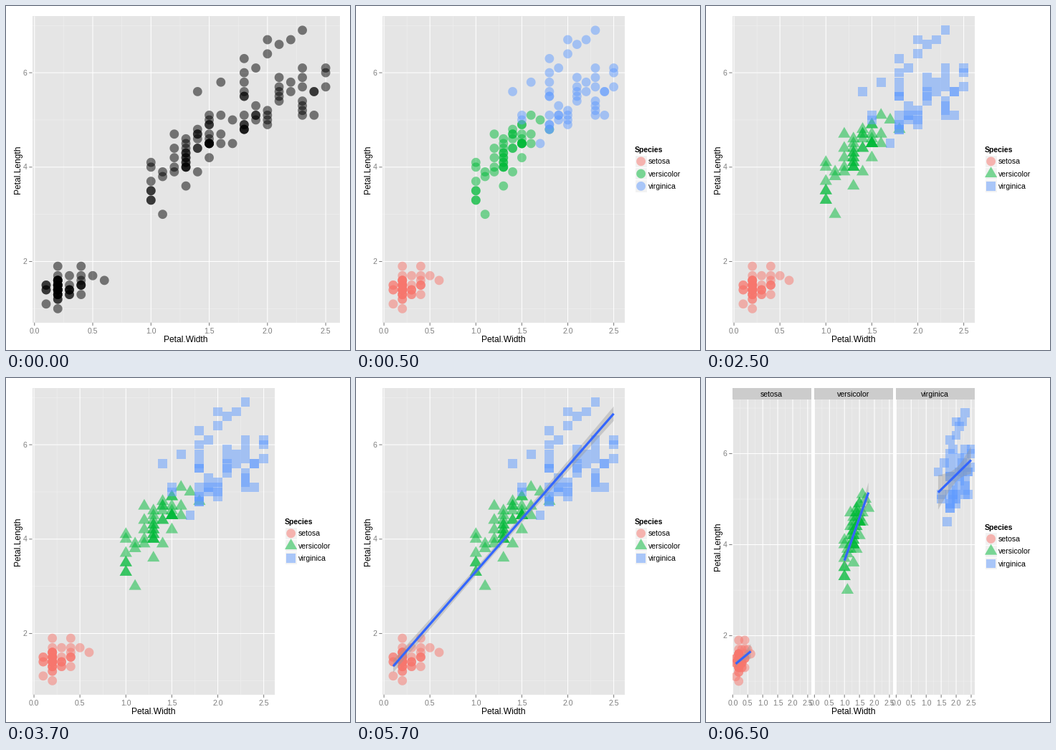
These frames come from a looping animation (480 px wide and 480 px high, 8000 ms). A matplotlib script:

```python
import numpy as np
import matplotlib.pyplot as plt
from matplotlib.animation import FuncAnimation
from matplotlib.collections import PolyCollection
from matplotlib.patches import Polygon, Rectangle

SIZE = 480
plt.rcParams.update({
    "font.family": "Liberation Sans",
    "text.hinting": "force_autohint",
    "text.hinting_factor": 8,
})

# Petal lengths grouped by petal width
setosa = {
    0.1: [1.1] + [1.4] * 2 + [1.5] * 2,
    0.2: [1.0] + [1.2] * 2 + [1.3] * 4 + [1.4] * 8 + [1.5] * 7
         + [1.6] * 5 + [1.7, 1.9],
    0.3: [1.3] * 2 + [1.4] * 3 + [1.5, 1.7],
    0.4: [1.3] + [1.5] * 3 + [1.6, 1.7, 1.9],
    0.5: [1.7],
    0.6: [1.6],
}
versicolor = {
    1.0: [3.3] * 2 + [3.5] * 2 + [3.7, 4.0, 4.1],
    1.1: [3.0, 3.8, 3.9],
    1.2: [3.9, 4.0, 4.2, 4.4, 4.7],
    1.3: [3.6] + [4.0] * 3 + [4.1, 4.2, 4.3] * 2 + [4.4, 4.5, 4.6],
    1.4: [3.9] + [4.4, 4.7] * 2 + [4.6, 4.8],
    1.5: [4.2] + [4.5] * 5 + [4.6, 4.7] + [4.9] * 2,
    1.6: [4.5, 4.7, 5.1],
    1.7: [5.0],
    1.8: [4.8],
}
virginica = {
    1.4: [5.6],
    1.5: [5.0, 5.1],
    1.6: [5.8],
    1.7: [4.5],
    1.8: [4.8, 4.9, 5.5] * 2 + [5.1, 5.6, 5.8, 6.0, 6.3],
    1.9: [5.0, 5.1, 5.1, 5.3, 6.1],
    2.0: [4.9, 5.0, 5.1, 5.2, 6.4, 6.7],
    2.1: [5.4, 5.5, 5.6, 5.7, 5.9, 6.6],
    2.2: [5.6, 5.8, 6.7],
    2.3: [5.1, 5.2, 5.3, 5.4, 5.7, 5.9, 6.1, 6.9],
    2.4: [5.1, 5.6, 5.6],
    2.5: [5.7, 6.0, 6.1],
}


def flatten(groups):
    return np.array([(w, l) for w, lengths in groups.items() for l in lengths])


NAMES = ["setosa", "versicolor", "virginica"]
DATA = [flatten(g) for g in (setosa, versicolor, virginica)]
COLORS = ["#F8766D", "#00BA38", "#619CFF"]
X_RANGE = (-0.02, 2.62)
Y_RANGE = (0.705, 7.195)
LEFT, TOP, BOTTOM = 36.5, 14.4, 441.8
WIDE, NARROW = 465.6, 375.0
FACET_TOP, GAP = 29.6, 3.6
RADIUS = 6.4


def regular(n, scale=1.0, turn=0.0):
    a = turn + np.arange(n) * 2 * np.pi / n
    return RADIUS * scale * np.column_stack([np.cos(a), np.sin(a)])


def to_pixel(v):
    return np.floor(np.asarray(v) + 0.5)


CIRCLE = regular(48)
TRIANGLE = regular(3, 1.5551, -np.pi / 2)
SQUARE = regular(4, np.sqrt(2), np.pi / 4)
SHAPES = [CIRCLE, TRIANGLE, SQUARE]

fig = plt.figure(figsize=(SIZE / 72, SIZE / 72), dpi=72, facecolor="white")
ax = fig.add_axes([0, 0, 1, 1])
ax.set_xlim(0, SIZE)
ax.set_ylim(SIZE, 0)
ax.axis("off")


class Scene:
    """Artists of one plot state, placed in pixel coordinates."""

    def __init__(self):
        self.artists = []

    def add(self, artist, clip=None):
        artist.set_snap(False)
        artist.set_zorder(len(self.artists))
        if clip is not None:
            artist.set_clip_path(clip)
        self.artists.append(artist)
        return artist

    def rect(self, x0, y0, x1, y1, color):
        x0, y0, x1, y1 = to_pixel([x0, y0, x1, y1])
        patch = Rectangle((x0, y0), x1 - x0, y1 - y0, fc=color, lw=0)
        return self.add(ax.add_patch(patch))

    def line(self, xs, ys, color, width, clip=None):
        (ln,) = ax.plot(xs, ys, color=color, lw=width, solid_capstyle="butt")
        self.add(ln, clip)

    def text(self, x, y, s, size=10.5, color="black", ha="center", **kw):
        self.add(ax.text(x, y, s, size=size, color=color, ha=ha,
                         va="baseline", **kw))

    def points(self, centers, shape, color, clip=None):
        outlines = [shape + c for c in centers]
        if shape is SQUARE:
            outlines = [to_pixel(o) for o in outlines]
        coll = PolyCollection(outlines, facecolors=color, alpha=0.5,
                              edgecolors="none", linewidths=0)
        ax.add_collection(coll, autolim=False)
        self.add(coll, clip)

    def show(self, visible):
        for artist in self.artists:
            artist.set_visible(visible)


class Panel:
    def __init__(self, scene, x0, x1, top=TOP, y_axis=True):
        self.scene, self.x0, self.x1, self.top = scene, x0, x1, top
        self.area = scene.rect(x0, top, x1, BOTTOM, "#E5E5E5")
        self.grid(np.arange(0.25, 2.5, 0.5), (1, 3, 5, 7), "#F2F2F2", 0.53)
        self.grid(np.arange(0, 2.6, 0.5), (2, 4, 6), "white", 1.07)
        for v in np.arange(0, 2.6, 0.5):
            x = self.px(v)
            scene.line([x, x], [BOTTOM, BOTTOM + 4.25], "#7F7F7F", 1.07)
            scene.text(x, 457, f"{v:.1f}", color="#7F7F7F")
        if y_axis:
            for v in (2, 4, 6):
                y = self.py(v)
                scene.line([x0 - 4.25, x0], [y, y], "#7F7F7F", 1.07)
                scene.text(x0 - 7.1, y + 3.5, str(v), color="#7F7F7F",
                           ha="right")

    def px(self, v):
        lo, hi = X_RANGE
        return self.x0 + (v - lo) / (hi - lo) * (self.x1 - self.x0)

    def py(self, v):
        lo, hi = Y_RANGE
        return BOTTOM - (v - lo) / (hi - lo) * (BOTTOM - self.top)

    def grid(self, xs, ys, color, width):
        for y in map(self.py, ys):
            self.scene.line([self.x0, self.x1], [y, y], color, width,
                            self.area)
        for x in map(self.px, xs):
            self.scene.line([x, x], [self.top, BOTTOM], color, width,
                            self.area)

    def points(self, data, shape, color):
        centers = np.column_stack([self.px(data[:, 0]), self.py(data[:, 1])])
        self.scene.points(centers, shape, color, self.area)

    def smooth(self, data):
        """Least-squares line with its 95% confidence band."""
        x, y = data.T
        slope, start = np.polyfit(x, y, 1)
        df = len(x) - 2
        sigma = np.sqrt(np.sum((y - start - slope * x) ** 2) / df)
        spread = np.sum((x - x.mean()) ** 2)
        gx = np.linspace(x.min(), x.max(), 80)
        fit = start + slope * gx
        half = (1.96 + 2.4 / df) * sigma * np.sqrt(
            1 / len(x) + (gx - x.mean()) ** 2 / spread)
        band = np.column_stack([
            self.px(np.r_[gx, gx[::-1]]),
            self.py(np.r_[fit + half, (fit - half)[::-1]])])
        patch = Polygon(band, fc="#999999", alpha=0.4, lw=0)
        self.scene.add(ax.add_patch(patch), self.area)
        self.scene.line(self.px(gx), self.py(fit), "#3366FF", 3.2, self.area)


def axis_titles(scene, right, top=TOP):
    scene.text((LEFT + right) / 2, 469, "Petal.Width", size=12)
    scene.text(20, (top + BOTTOM) / 2, "Petal.Length", size=12, rotation=90,
               rotation_mode="anchor")


def legend(scene, shapes, top=TOP):
    middle = (top + BOTTOM) / 2
    key = 17.28
    scene.text(389, middle - 24, "Species", ha="left", weight="bold")
    for i, (name, shape, color) in enumerate(zip(NAMES, shapes, COLORS)):
        y = middle - 11.3 + i * key
        scene.rect(389.5, y - key / 2 + 0.5, 388.5 + key, y + key / 2 - 0.5,
                   "#F2F2F2")
        scene.points([(389 + key / 2, y)], shape, color)
        scene.text(408, y + 3.7, name, ha="left")


def plain_scene():
    scene = Scene()
    Panel(scene, LEFT, WIDE).points(np.vstack(DATA), CIRCLE, "black")
    axis_titles(scene, WIDE)
    return scene


def species_scene(shapes, smooth=False):
    scene = Scene()
    panel = Panel(scene, LEFT, NARROW)
    for data, shape, color in zip(DATA, shapes, COLORS):
        panel.points(data, shape, color)
    if smooth:
        panel.smooth(np.vstack(DATA))
    axis_titles(scene, NARROW)
    legend(scene, shapes)
    return scene


def facet_scene():
    scene = Scene()
    width = (NARROW - LEFT - 2 * GAP) / 3
    for i, name in enumerate(NAMES):
        x0 = LEFT + i * (width + GAP)
        scene.rect(x0, TOP, x0 + width, FACET_TOP, "#CCCCCC")
        scene.text(x0 + width / 2, 26, name)
        panel = Panel(scene, x0, x0 + width, FACET_TOP, y_axis=i == 0)
        panel.points(DATA[i], SHAPES[i], COLORS[i])
        panel.smooth(DATA[i])
    axis_titles(scene, NARROW, FACET_TOP)
    legend(scene, SHAPES, FACET_TOP)
    return scene


scenes = [
    plain_scene(),
    species_scene([CIRCLE] * 3),
    species_scene(SHAPES),
    species_scene(SHAPES, smooth=True),
    facet_scene(),
]
STEP = 500
timeline = np.repeat(np.arange(5), [1, 4, 4, 4, 3])


def update(frame):
    for i, scene in enumerate(scenes):
        scene.show(i == timeline[frame])
    return []


update(0)
anim = FuncAnimation(fig, update, frames=len(timeline), interval=STEP,
                     init_func=lambda: update(0), repeat=True, repeat_delay=0)
plt.show()
```
